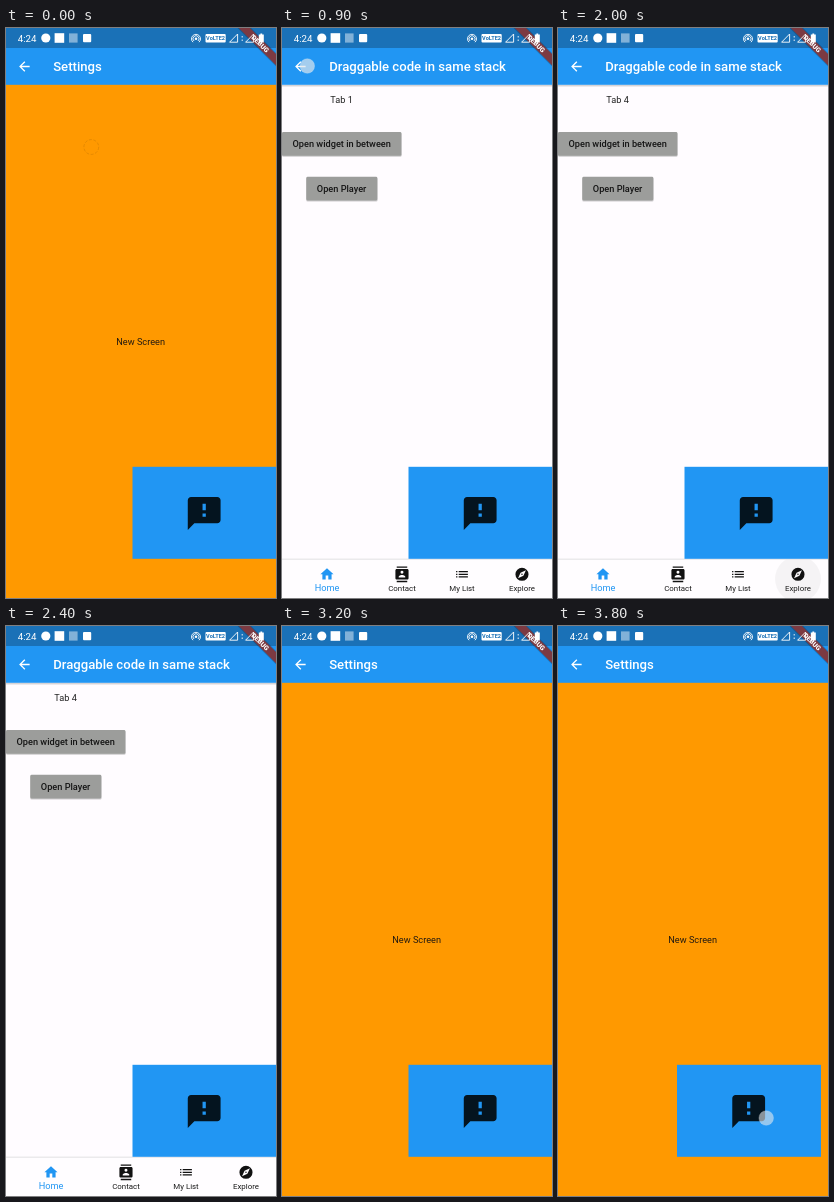
These frames come from a looping animation (270 px wide and 570 px high, 3.9 s). An HTML page:

```html
<!DOCTYPE html>
<html lang="en">
<head>
<meta charset="utf-8">
<title>Draggable overlay demo</title>
<style>
  html, body { margin: 0; width: 100%; height: 100%; overflow: hidden; background: #fffcff; }
  svg { display: block; width: 270px; height: 570px; font-family: Roboto, sans-serif; }
  text { font-size: 9.2px; }
  .title { font-size: 13.14px; font-weight: 500; fill: #fff; }
  .button text { font-weight: 500; fill: #151515; }
  .nav text { font-size: 7.9px; text-anchor: middle; fill: #1a1a1a; }
  .nav .on { font-size: 9.2px; fill: #2196f3; }
</style>
</head>
<body>
<svg viewBox="0 0 270 570">
  <defs>
    <linearGradient id="shade" x2="0" y2="1">
      <stop stop-opacity=".22"/><stop offset="1" stop-opacity="0"/>
    </linearGradient>
    <clipPath id="navClip"><rect y="531.8" width="270" height="39"/></clipPath>
  </defs>

  <g id="home">
    <rect width="270" height="570" fill="#fffcff"/>
    <rect y="56.8" width="270" height="2.6" fill="url(#shade)"/>
    <text id="tab" x="48.3" y="75.3" fill="#222">Tab 1</text>
    <g class="button">
      <rect y="105" width="119.6" height="23.8" rx="1.5" opacity=".2"/>
      <rect y="104" width="119.4" height="23.7" rx="1.3" fill="#9c9d9b"/>
      <text x="10.5" y="119.3">Open widget in between</text>
      <rect x="24.2" y="149.6" width="71.4" height="23.8" rx="1.5" opacity=".2"/>
      <rect x="24.3" y="148.7" width="71" height="23.7" rx="1.3" fill="#9c9d9b"/>
      <text x="34.8" y="163.9">Open Player</text>
    </g>
    <g class="nav">
      <rect y="530.6" width="270" height="1.4" fill="#e6e4e7"/>
      <rect y="531.8" width="270" height="39" fill="#fffdff"/>
      <circle id="ripple" cx="240" cy="551" r="23" opacity="0" clip-path="url(#navClip)"/>
      <g id="items"></g>
    </g>
  </g>

  <g id="settings">
    <rect y="56" width="270" height="514" fill="#ff9900"/>
    <text x="110.3" y="317.2" fill="#231a10">New Screen</text>
  </g>

  <rect y="19.5" width="270" height="37.3" fill="#2196f3"/>
  <path transform="translate(10.5 30.6) scale(.657)" fill="#fff"
    d="M20 11H7.83l5.59-5.59L12 4l-8 8 8 8 1.41-1.41L7.83 13H20z"/>
  <text id="title" class="title" x="47.2" y="43.3">Settings</text>

  <g id="box">
    <rect x="126.5" y="438.8" width="144" height="92" fill="#2196f3"/>
    <path transform="translate(178.5 465.8) scale(1.64)" fill="#04141f"
      d="M20 2H4c-1.1 0-2 .9-2 2v18l4-4h14c1.1 0 2-.9 2-2V4c0-1.1-.9-2-2-2zm-7 12h-2v-2h2zm0-4h-2V6h2z"/>
  </g>

  <rect width="270" height="20" fill="#1a71b7"/>
  <g transform="translate(270 0) rotate(45)">
    <rect x="-27" y="17.6" width="54" height="9.6" opacity=".22"/>
    <rect x="-27" y="18.4" width="54" height="7.9" fill="#7c3a42"/>
    <text y="24.7" text-anchor="middle" fill="#fff" style="font-size:6.7px;font-weight:900">DEBUG</text>
  </g>

  <g fill="#fff">
    <text x="11.8" y="13.6" style="font-size:9.7px">4:24</text>
    <circle cx="39.8" cy="10" r="4.6"/>
    <rect x="48.6" y="5.2" width="9.6" height="9.6"/>
    <rect x="63" y="5.4" width="8.6" height="9.2" opacity=".45"/>
    <rect x="77" y="6" width="8.2" height="8.2" rx="1"/>
    <rect x="199.5" y="6" width="20.2" height="8.6" rx="1"/>
    <text x="209.6" y="12.4" text-anchor="middle" fill="#1a71b7" style="font-size:5.6px;font-weight:700">VoLTE2</text>
    <circle cx="190" cy="10.8" r="1.3"/>
    <path d="M235.6 8h1.3v1.6h-1.3zM235.6 11.4h1.3V13h-1.3z" opacity=".7"/>
    <path d="M252.8 6.6h1.6V5.4h1.8v1.2h1.6v8h-5z"/>
    <g fill="none" stroke="#fff" stroke-width=".9">
      <path d="M188 13a3 3 0 1 1 4 0M187 14.2a4.5 4.5 0 1 1 6 0"/>
      <path d="M223.6 14.2h8V6zM239.6 14.2h8V6z"/>
    </g>
  </g>

  <circle id="ghost" cx="85.3" cy="119" r="7.4" fill="none" stroke="#c97800"
    stroke-width=".8" stroke-dasharray="3 1.6" opacity=".6"/>
  <circle id="dot" r="7.3" fill="#e2e8ec" stroke="#fff" stroke-opacity=".35" opacity="0"/>
</svg>

<script>
const LOOP = 3900;
const $ = id => document.getElementById(id);

const items = [
  [45, "Home", "M10 20v-6h4v6h5v-8h3L12 3 2 12h3v8z"],
  [120, "Contact", "M20 0H4v2h16zM4 24h16v-2H4zM20 4H4c-1.1 0-2 .9-2 2v12c0 1.1.9 2 2 2h16c1.1 0 2-.9 2-2V6c0-1.1-.9-2-2-2zM12 6.75a2.25 2.25 0 1 1 0 4.5a2.25 2.25 0 1 1 0-4.5zM17 17H7v-1.5c0-1.67 3.33-2.5 5-2.5s5 .83 5 2.5z"],
  [180, "My List", "M3 13h2v-2H3zM3 17h2v-2H3zM3 9h2V7H3zM7 13h14v-2H7zM7 17h14v-2H7zM7 7v2h14V7z"],
  [240, "Explore", "M12 10.9a1.1 1.1 0 1 0 0 2.2a1.1 1.1 0 1 0 0-2.2zM12 2a10 10 0 1 0 0 20a10 10 0 1 0 0-20zm2.19 12.19L6 18l3.81-8.19L18 6z"]
];
$("items").innerHTML = items.map(([x, label, d], i) => `
  <path transform="translate(${x - 7.9} 538.4) scale(.657)" fill-rule="evenodd"
    fill="${i ? "#111" : "#2196f3"}" d="${d}"/>
  <text x="${x}" y="${i ? 562.9 : 563.2}" class="${i ? "" : "on"}">${label}</text>`).join("");

// Each step overrides only the values that change.
const steps = [
  { at: 0, settings: 1, tab: 1, x: 25.3, y: 38, dot: 0, ripple: 0, r: 23, drag: 0, ghost: .6 },
  { at: 100, ghost: 0 },
  { at: 500, dot: .68 },
  { at: 900, settings: 0 },
  { at: 1000, dot: .3 },
  { at: 1100, dot: 0 },
  { at: 1400, x: 240, y: 549, dot: .55 },
  { at: 1600, tab: 4, ripple: .05, r: 9 },
  { at: 1700, dot: .3, r: 14 },
  { at: 1800, dot: 0, r: 19 },
  { at: 1900, r: 23 },
  { at: 2000, ripple: .04 },
  { at: 2100, ripple: .025 },
  { at: 2200, ripple: .01 },
  { at: 2300, ripple: 0 },
  { at: 2900, x: 85.3, y: 119, dot: .55 },
  { at: 3100, settings: .5, dot: .3 },
  { at: 3200, settings: 1, dot: 0 },
  { at: 3700, x: 212, y: 492, dot: .6, drag: -3 },
  { at: 3800, x: 208.2, drag: -7.5 }
];

function stateAt(t) {
  return Object.assign({}, ...steps.filter(s => s.at <= t));
}

function set(id, attrs) {
  for (const key in attrs) $(id).setAttribute(key, attrs[key]);
}

function draw(t) {
  const s = stateAt(t);
  set("settings", { opacity: s.settings });
  set("dot", { cx: s.x, cy: s.y, opacity: s.dot });
  set("ripple", { r: s.r, opacity: s.ripple });
  set("box", { transform: `translate(${s.drag} 0)` });
  set("ghost", { opacity: s.ghost });
  $("tab").textContent = `Tab ${s.tab}`;
  $("title").textContent = s.settings >= .5 ? "Settings" : "Draggable code in same stack";
}

const start = performance.now();
function tick() {
  draw((performance.now() - start) % LOOP);
  requestAnimationFrame(tick);
}
tick();
</script>
</body>
</html>
```
